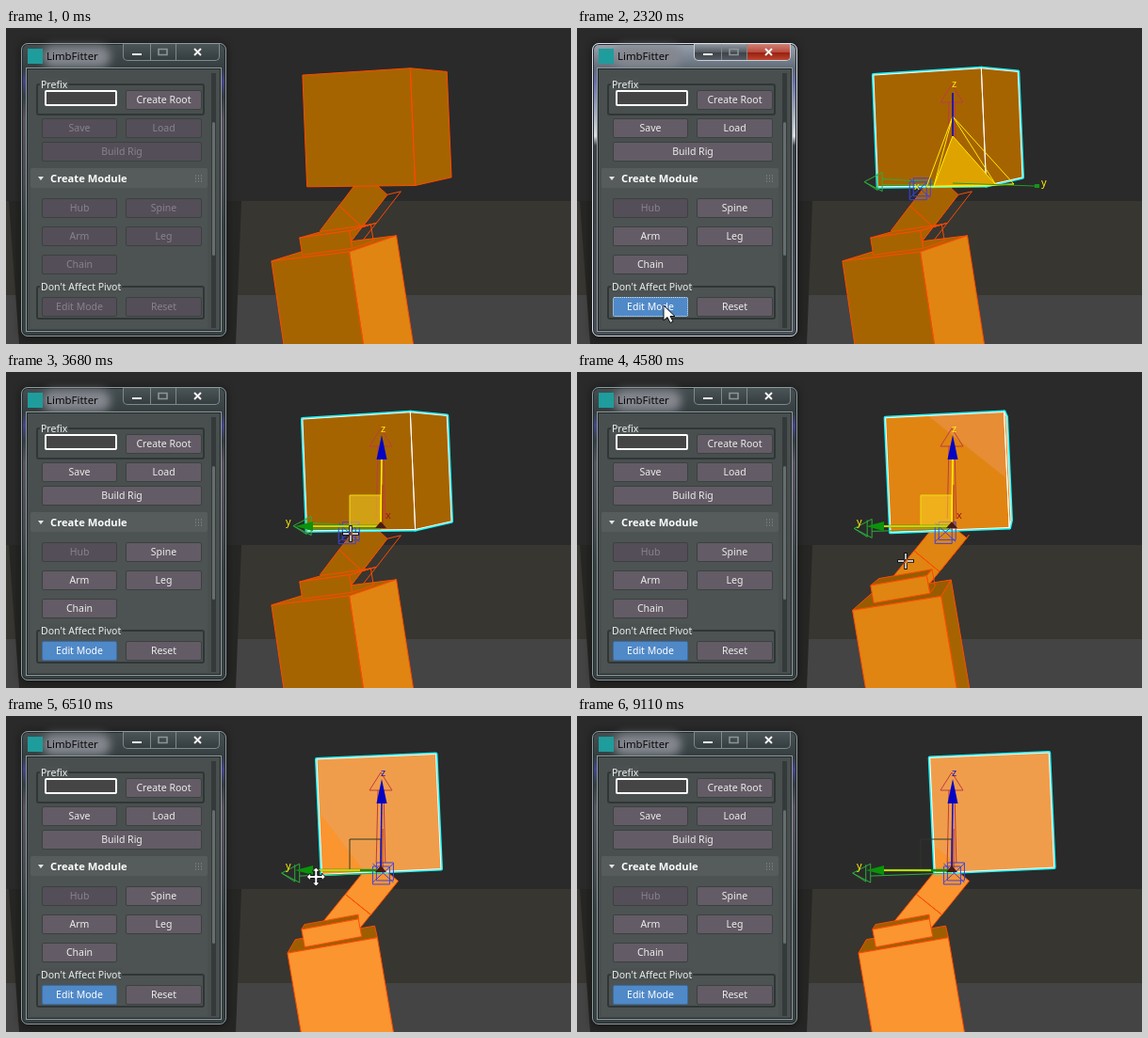
An HTML page with a canvas for the animation above (9.31 s loop, 600x336 px).

```html
<!DOCTYPE html>
<html lang="en">
<head>
<meta charset="utf-8">
<title>Rig tool</title>
<style>
html, body { margin: 0; width: 100%; height: 100%; overflow: hidden; background: #2a2a2a; }
#stage { position: absolute; left: 0; top: 0; width: 600px; height: 336px; overflow: hidden; font: 10.5px "Noto Sans", "DejaVu Sans", sans-serif; color: #ececec; }
#stage *, canvas { position: absolute; box-sizing: border-box; }
.win { left: 16px; top: 16px; width: 218px; height: 312px; border: 1px solid #8d9c9f; border-radius: 7px; box-shadow: inset 0 0 0 1px #23292b, 0 1px 9px 1px rgba(0,0,0,.4); background: linear-gradient(#454f51, #363e40 26px, #46468c 40px, #373e42 56px, #5a5361 80px, #4a4b52 150px, #394143 190px); }
.active .win { border-color: #dfe2ee; background: linear-gradient(#98a3af, #626c78 26px, #6670ac 40px, #aab0bf 75px, #dcdfe2 98px, #3c4147 108px, #4a5058); }
.halo { left: 22px; top: 2px; width: 72px; height: 23px; border-radius: 12px; background: #85878f; filter: blur(5px); }
.icon { left: 6px; top: 5px; width: 16px; height: 16px; background: #1f9c9c; }
.title { left: 26px; top: 5px; font-size: 11.4px; line-height: 16px; color: #08080a; white-space: nowrap; }
.caps { left: 107px; top: 0; width: 103px; height: 18px; border: 1px solid #7d898b; border-top: 0; border-radius: 0 0 5px 5px; overflow: hidden; background: linear-gradient(#4b5557, #353d3f); }
.active .caps { border-color: #c9ced6; background: linear-gradient(#9298a0, #565c64 50%, #3c4148 51%, #555b63); }
.caps i { top: 0; width: 1px; height: 18px; background: #7d898b; }
.caps b { left: 55px; top: 0; width: 47px; height: 18px; }
.active .caps b { background: linear-gradient(#d08076, #b8483a 50%, #98200f 51%, #c04a34); }
.caps svg { left: 1px; top: 0; }
.client { left: 22px; top: 43px; width: 206px; height: 279px; background: #484f4e; border: 1px solid #202526; box-shadow: 0 0 0 1px #8d9a9c; }
.roll { left: 26px; top: 149px; width: 188px; height: 170px; background: #4c5352; }
.band { left: 26px; top: 149px; width: 188px; height: 21px; background: #555c5b; border-radius: 2px; }
.band span { left: 21px; top: 3px; font-weight: 700; font-size: 11.2px; line-height: 16px; color: #fff; white-space: nowrap; }
.band svg { left: 0; top: 0; }
.group { left: 32px; width: 179px; border: 2px solid #303636; border-radius: 3px; }
.group span { left: 2px; top: -8px; padding: 0 1px; line-height: 14px; white-space: nowrap; background: #4a5150; }
.field { left: 41px; top: 66px; width: 77px; height: 17px; border: 2px solid #fff; border-radius: 2px; background: #454545; }
.btn { height: 21px; line-height: 19px; text-align: center; border: 1px solid #3b4140; border-radius: 2px; background: #635b65; }
.btn.off { background: #544e58; color: #89828d; }
.btn.hover { background: #34332d; border-color: #2b2b28; color: #fff; }
.btn.on { background: #5089c8; border-color: #3a6ca6; color: #fff; }
.active .btn.on { border: 1px dotted #d8e6f4; }
.track { left: 218px; top: 48px; width: 5px; height: 271px; background: #343a3a; }
.thumb { left: 219px; top: 100px; width: 3px; height: 142px; background: #666d6d; border-radius: 2px; }
.cur { left: 0; top: 0; overflow: visible; }
</style>
</head>
<body>
<div id="stage">
  <canvas id="view" width="600" height="336"></canvas>
  <div id="panel">
    <div class="win">
      <div class="halo"></div><div class="icon"></div><div class="title">LimbFitter</div>
      <div class="caps"><b></b><i style="left:28px"></i><i style="left:55px"></i>
        <svg width="101" height="18" fill="none" stroke="#f2f2f2" stroke-width="2"><path d="M8 11h10"/><path d="M36 5.500h9v6h-9z" stroke="#8d9496" stroke-width="1.600"/><path d="M74 5l7 7m0-7l-7 7"/></svg>
      </div>
    </div>
    <div class="client"></div>
    <div class="roll"></div>
    <div class="band"><span>Create Module</span>
      <svg width="188" height="21"><path d="M8 9h6l-3 4z" fill="#e4e4e4"/><path d="M175 8h7m-7 3h7m-7 3h7" stroke="#8d9493" stroke-dasharray="1 2"/></svg>
    </div>
    <div class="group" style="top:59px;height:34px"><span>Prefix</span></div>
    <div class="group" style="top:274px;height:36px"><span>Don't Affect Pivot</span></div>
    <div class="field"></div>
    <div class="track"></div><div class="thumb"></div>
  </div>
  <svg class="cur" width="600" height="336"><g id="cursor">
    <path id="arrow" d="M0 0V16l4-3.500 3 6 3-1.500-3-5.500h5z" fill="#fff" stroke="#111"/>
    <g id="cross" fill="none"><path d="M-9 0h7m4 0h7M0-9v7m0 4v7" stroke="#111" stroke-width="3.500"/><path d="M-8 0h6m4 0h6M0-8v6m0 4v6" stroke="#fff" stroke-width="1.400"/></g>
    <path id="move" d="M0-10l4 4h-2.500v4.500H6V-4l4 4-4 4V1.500H1.500V6H4l-4 4-4-4h2.500V1.500H-6V4l-4-4 4-4v2.500h4.500V-6H-4z" fill="#fff" stroke="#111"/>
  </g></svg>
</div>
<script>
const LOOP = 9310;
const $ = id => document.getElementById(id);
const c = $('view').getContext('2d');

const btns = {};
function addRow(top, ...labels) {
  labels.forEach((label, col) => {
    if (!label) return;
    const b = document.createElement('div');
    b.textContent = label;
    b.style.cssText = `left:${38 + 89 * col}px;top:${top}px;width:${labels.length < 2 ? 170 : 80 + col}px`;
    $('panel').append(b);
    btns[label] = b;
  });
}
addRow(66, '', 'Create Root');
addRow(96, 'Save', 'Load');
addRow(121, 'Build Rig');
addRow(181, 'Hub', 'Spine');
addRow(211, 'Arm', 'Leg');
addRow(241, 'Chain', '');
addRow(286, 'Edit Mode', 'Reset');

const clamp = v => Math.max(0, Math.min(1, v));
const ramp = (t, a, b) => clamp((t - a) / (b - a));
const ease = v => v * v * (3 - 2 * v);
const lerp = (a, b, f) => a + (b - a) * f;
// Blend through the three views: start, orbiting, settled
const mix = (a, b, d, k) => k < 1 ? lerp(a, b, k) : lerp(b, d, k - 1);
const tone = (a, b, d, k) => `rgb(${a.map((v, i) => Math.round(mix(v, b[i], d[i], k)))})`;
const track = (keys, t) => {
  let i = 0;
  while (i < keys.length - 2 && t >= keys[i + 1][0]) i++;
  const a = keys[i], b = keys[i + 1], f = ease(ramp(t, a[0], b[0]));
  return a.slice(1).map((v, n) => lerp(v, b[n + 1], f));
};

const path = (pts, close) => {
  c.beginPath();
  pts.forEach(p => c.lineTo(p[0], p[1]));
  if (close) c.closePath();
};
const fill = (pts, col) => { path(pts); c.fillStyle = col; c.fill(); };
const line = (pts, col, w = 1, close = false) => {
  path(pts, close);
  c.strokeStyle = col; c.lineWidth = w; c.stroke();
};
const text = (s, x, y, col) => { c.fillStyle = col; c.fillText(s, x, y); };

// Perspective camera orbiting the neck joint
const cam = { yaw: 0, pitch: 0, k: 0 };
function aim(k) {
  cam.k = k;
  cam.yaw = mix(23, 4.5, -1.6, k) * Math.PI / 180;
  cam.pitch = mix(.05, .04, 0, k);
}
function project(x, y, z) {
  const cos = Math.cos(cam.yaw), sin = Math.sin(cam.yaw);
  const far = z * cos - x * sin, s = 1 / (1 + far / 1000);
  return [398 + (x * cos + z * sin) * s, 130 - (y + far * cam.pitch) * s];
}

// x, y: upper left corner of the front; roll turns the box in its front plane
const parts = {
  upper: { x: -9, y: -23, w: 34, h: 45, near: -24, far: 14, roll: -.68 },
  lower: { x: -37.5, y: -58, w: 34, h: 36, near: -24, far: 14, roll: -.68 },
  body: { x: -94, y: -113.5, w: 90, h: 200, near: -68, far: 57, roll: .168 },
  collar: { x: -82.4, y: -94, w: 59.5, h: 18.5, near: -28, far: 28, roll: .18 },
  head: { x: -62, y: 79, w: 119, h: 115, near: -60, far: 50, roll: .045 }
};
const EDGE = '#ff4a00', YEL = '#ffee00', CYAN = '#20f4f4';
const dark = [166, 100, 0], lit = [224, 133, 17], bright = [250, 149, 48];

function faces(b) {
  const cos = Math.cos(b.roll), sin = Math.sin(b.roll);
  const at = (i, j, z) => project(b.x + i * b.w * cos + j * b.h * sin, b.y + i * b.w * sin - j * b.h * cos, z);
  const { near: n, far: f } = b;
  return {
    top: [at(0, 0, n), at(1, 0, n), at(1, 0, f), at(0, 0, f)],
    side: [at(1, 0, n), at(1, 0, f), at(1, 1, f), at(1, 1, n)],
    front: [at(0, 0, n), at(1, 0, n), at(1, 1, n), at(0, 1, n)]
  };
}
function drawBox(b, solid) {
  const f = faces(b), k = cam.k;
  const face = (pts, col) => { if (col) fill(pts, col); line(pts, EDGE, 1, true); };
  if (b.roll > 0) face(f.top, tone(dark, [152, 92, 0], [158, 94, 0], k));
  if (f.side[1][0] > f.side[0][0]) face(f.side, solid && tone(lit, dark, dark, k));
  face(f.front, tone(dark, lit, bright, k));
}

// Lighter sheen above a diagonal that sweeps over the head
function sheen(front, k, dx) {
  const d = dx / 41;
  const x1 = mix(375, 375, 336, k) + dx, y1 = mix(48, 48, 105, k) + 32 * d;
  const x2 = mix(459, 459, 385, k) + 33 * d, y2 = mix(115, 115, 167, k);
  const ux = 9 * (x2 - x1), uy = 9 * (y2 - y1);
  c.save();
  path(front); c.clip();
  c.globalAlpha = clamp(k);
  fill([[x1 - ux, y1 - uy], [x2 + ux, y2 + uy], [x2 + ux, y1 - uy]], tone(dark, [230, 141, 53], [240, 157, 75], k));
  c.restore();
}
function drawHead(k, dx, chosen) {
  const shift = pts => pts.map(([x, y]) => [x + dx, y - dx / 30]);
  const f = faces(parts.head), front = shift(f.front), side = shift(f.side);
  const turned = side[1][0] > side[0][0];
  const outline = (col, w) => { if (turned) line(side, col, w, true); line(front, col, w, true); };
  if (chosen) outline(CYAN, 4);
  if (turned) fill(side, tone(dark, lit, bright, k));
  fill(front, tone(dark, lit, bright, k));
  if (k > 0) sheen(front, k, dx);
  outline(chosen ? '#fff' : EDGE, 1);
}

// Pivot pyramid shown before editing starts
function pyramid() {
  const apex = [399, 94], core = [399, 115], base = [371, 379, 445, 464].map((x, i) => [x, 169 - i]);
  fill([core, base[1], base[2]], '#dfa300');
  base.forEach(p => line([apex, p], YEL));
  line([base[1], core, base[2]], YEL);
  line([base[0], [432, 168], base[3], base[1]], YEL);
  line([[399, 69], core], '#0000d8', 1.5);
  line([[399, 165], [486, 168]], '#209a20');
  c.fillStyle = '#159515'; c.fillRect(486, 166, 5, 4);
  text('z', 398, 63, YEL); text('y', 493, 168, YEL); text('x', 358, 172, YEL);
}

// Triangle whose tip points along (ux, uy)
const cone = ([x, y], ux, uy, len, half) => [
  [x, y], [x - ux * len + uy * half, y - uy * len - ux * half], [x - ux * len - uy * half, y - uy * len + ux * half]];

function handles() {
  const green = '#2cae3c', red = '#bd3c45', blue = '#3c44e0';
  const joint = project(0, -36, 0), left = project(-105, -37, 0), up = project(0, 70, 0), [bx, by] = project(0, -34, -80);
  line(cone(left, -1, 0, 19, 10), green, 1, true);
  line(cone(left, -1, 0, 14, 9), green);
  line(cone(up, 0, -1, 19, 12), red, 1, true);
  for (const o of [-3, 3]) {
    line([[left[0] + 19, left[1] + o], [joint[0], joint[1] + o / 3]], green);
    line([[up[0] + o, up[1] + 19], [joint[0] + o * 1.6, joint[1] - 10]], red);
  }
  c.strokeStyle = blue; c.lineWidth = 1;
  for (const o of [-2, 2]) c.strokeRect(bx - 9 + o, by - 9 - o, 18, 19);
  for (const s of [-1, 1]) line([[bx - 11, by - 10 * s], [bx + 11, by + 10 * s]], blue);
}

function mover(k, drag) {
  const [x, y] = project(0, -34, 0), q = [[365, 131], [x, 131], [x, y], [365, y]];
  if (!drag) fill(q, 'rgba(255,220,40,.5)');
  line(q, drag ? '#2c3a28' : '#eedd10', 1, true);
  line([[x, y], [399, 90]], drag ? '#1414c8' : YEL, 1.6);
  line([[x + 2, y], [x + 2, 120]], '#b03018');
  line([[x, y], [326, 164]], '#0f8d12', 2.5);
  line([[drag ? 376 : x, y], [326, 164]], YEL, 1.4);
  fill(cone([399, 67], 0, -1, 26, 5.5), '#0404c4');
  fill(cone([307, 164], -1, 0, 19, 5), '#0b930b');
  fill(cone([x, y - 5], 0, -1, 7, 6), '#471c14');
  text('z', 398, 64, drag ? '#1818b8' : YEL);
  text('y', 297, 163, YEL);
  if (k < 1.6) text('x', 403, 156, '#a01818');
}

const cursorPath = [[460, 556, 150], [860, 432, 122], [1350, 432, 122], [1590, 206, 290], [1950, 92, 295],
  [2650, 92, 295], [3130, 313, 232], [3430, 366, 172], [3680, 366, 172], [4580, 349, 201], [5590, 354, 194], [5950, 333, 171]];
const cursorOut = [[7660, 374, 171], [8260, 308, 270], [9110, 488, 52]];
const dragPath = [[6150, 0], [6400, -9], [6950, 41]];

function drawCursor(t, dx) {
  const [x, y] = t < 5950 ? track(cursorPath, t) : t < 7350 ? [333 + dx, 171] : track(cursorOut, t);
  const kind = t >= 2860 && t < 5200 ? 'cross' : t >= 5950 && t < 7720 ? 'move' : 'arrow';
  for (const id of ['arrow', 'cross', 'move']) $(id).style.display = id === kind ? '' : 'none';
  $('cursor').setAttribute('transform', `translate(${x.toFixed(1)} ${y.toFixed(1)})`);
  $('cursor').style.display = t >= 460 && t < 9110 ? '' : 'none';
}

function drawPanel(t) {
  const ready = t >= 900, edit = t >= 2320;
  const over = t >= 1540 && t < 1660 ? 'Reset' : t >= 1750 && !edit ? 'Edit Mode' : '';
  for (const [label, b] of Object.entries(btns)) {
    const off = label === 'Hub' || (!ready && label !== 'Create Root');
    b.className = 'btn' + (edit && label === 'Edit Mode' ? ' on' : label === over ? ' hover' : off ? ' off' : '');
  }
  $('panel').className = t >= 2190 && t < 3680 ? 'active' : '';
}

function drawView(t, dx) {
  const chosen = t >= 900;
  const k = ease(ramp(t, 3680, 4580)) + .6 * ramp(t, 4580, 4760) + .4 * ease(ramp(t, 5020, 5390));
  aim(k);
  c.fillStyle = '#2a2a2a'; c.fillRect(0, 0, 600, 184);
  c.fillStyle = '#383630'; c.fillRect(0, 184, 600, 100);
  c.fillStyle = '#444'; c.fillRect(0, 284, 600, 52);
  fill([[3, 184], [250, 184], [244, 336], [14, 336]], '#262625');
  c.lineJoin = 'round';
  c.font = '11px "Noto Sans", sans-serif';
  drawBox(parts.lower, false);
  drawBox(parts.upper, false);
  drawBox(parts.body, true);
  drawBox(parts.collar, false);
  if (t >= 3060 && t < 3260) {
    const { top, side, front } = faces(parts.collar);
    line([top[0], top[3], top[2], side[2], side[3], front[3]], YEL, 2.2, true);
  }
  drawHead(k, dx, chosen);
  if (t >= 2320) handles();
  if (t >= 3430) mover(k, t >= 5950);
  else if (chosen) pyramid();
}

function tick(now) {
  const t = now % LOOP, dx = track(dragPath, t)[0];
  drawView(t, dx);
  drawPanel(t);
  drawCursor(t, dx);
}
const begin = performance.now();
const loop = () => { tick(performance.now() - begin); requestAnimationFrame(loop); };
loop();
</script>
</body>
</html>
```
